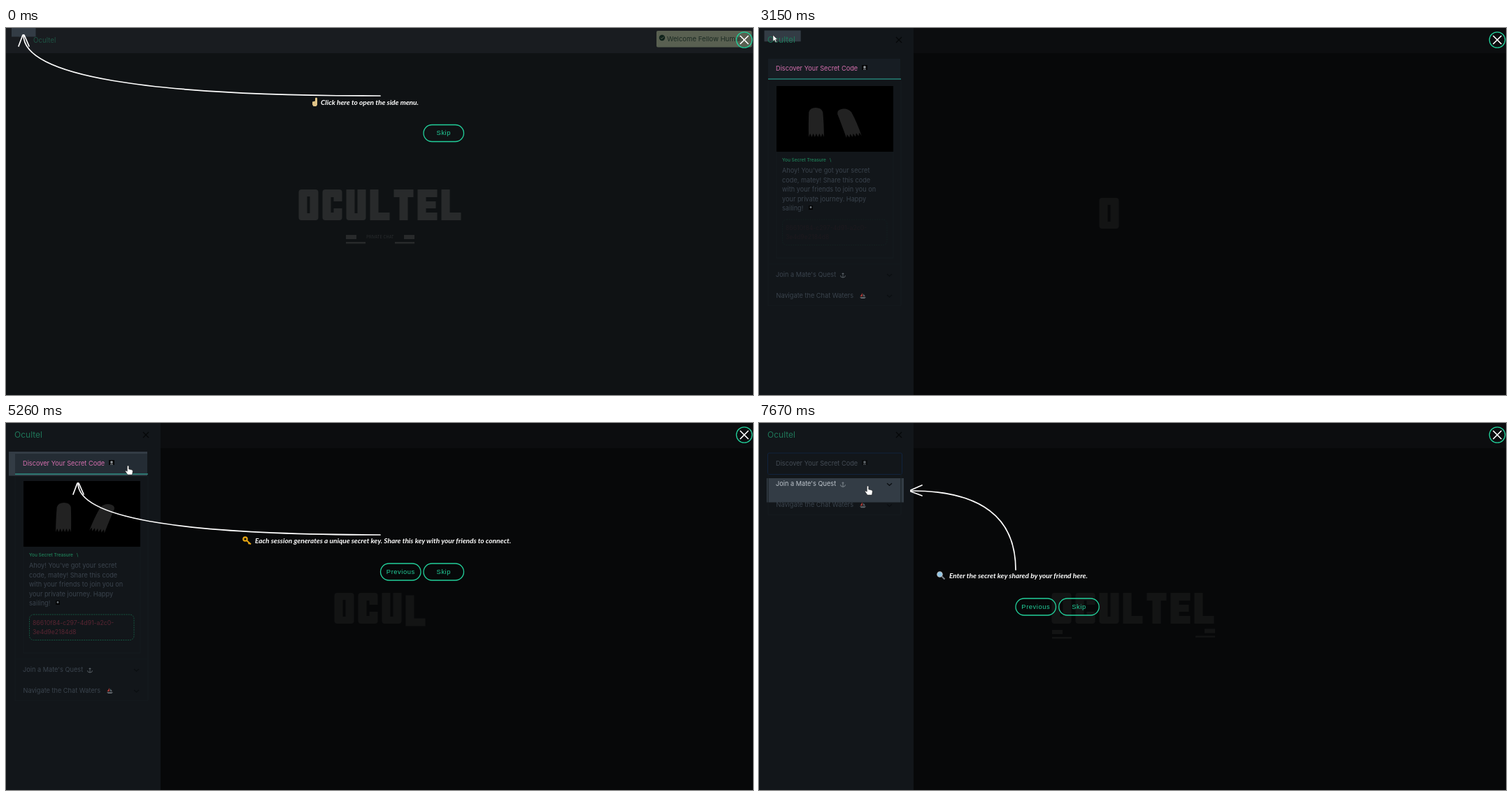
Recreate the animation shown at these times as an HTML page. Size 1068 by 525 pixels, loop 8 s.

```html
<!DOCTYPE html>
<html lang="en">
<head>
<meta charset="utf-8">
<title>Guided tour</title>
<style>
  html, body { margin: 0; width: 100%; height: 100%; overflow: hidden; background: #0f1214; }
  svg { display: block; width: 100vw; height: 100vh; }
  text { font: 9.2px Inter, "Open Sans", sans-serif; white-space: pre; }
  .label { font: italic bold 10.1px Lato, sans-serif; fill: #fff; }
  .button { font: 9.4px "Liberation Sans", Arial, sans-serif; letter-spacing: .55px; fill: #22cf9a; text-anchor: middle; }
  .line { fill: none; stroke: #fff; stroke-width: 1.7; stroke-linecap: round; stroke-linejoin: round; }
  .ring { fill: none; stroke: #22cf9a; stroke-width: 1.3; }
  .bars { fill: #282a2b; }
</style>
</head>
<body>
<svg viewBox="0 0 1068 525">
  <defs>
    <clipPath id="panelClip"><rect id="panelWindow" x="0" y="76" width="221" height="262"/></clipPath>
  </defs>

  <!-- page -->
  <rect width="1068" height="525" fill="#0f1214"/>
  <rect width="1068" height="36" fill="#191c20"/>
  <text x="39" y="20.5" style="font-size:9.7px" fill="#1f5444">Ocultel</text>
  <g id="logo" fill="#282a2b" fill-rule="evenodd"></g>
  <g id="barsLeft" class="bars"><path d="M486 296h15v6h-15zM486 306h28v2.4h-28z"/></g>
  <g id="barsRight" class="bars"><path d="M569 296h15v6h-15zM556 306h28v2.4h-28z"/></g>
  <text id="tagline" x="535" y="301" text-anchor="middle" style="font-size:5.6px" fill="#2b2e30">PRIVATE CHAT</text>
  <g id="toast">
    <rect x="930" y="4" width="136.5" height="23.5" rx="2" fill="#596051"/>
    <circle cx="938" cy="14" r="4.2" fill="#10231b"/>
    <path d="M936 14l1.5 1.6 2.8-3" fill="none" stroke="#596051"/>
    <text x="945" y="18.7" style="font-size:9.6px" fill="#1b2a22">Welcome Fellow Human</text>
  </g>
  <rect id="backdrop" width="1068" height="525"/>
  <rect id="progress" y="522" height="3" fill="#4fb0c6"/>

  <!-- side menu -->
  <rect class="side" width="221" height="525" fill="#12161a"/>
  <rect id="spotlight" fill="#333c45"/>
  <g class="side">
    <text x="12" y="21" style="font-size:12px" fill="#1f7659">Ocultel</text>
    <path d="M196 13l8 8m0-8l-8 8" stroke="#050709" stroke-width="1.3"/>
    <g id="openItem">
      <rect x="13" y="44" width="189" height="29" fill="#1b222a" opacity=".6"/>
      <path d="M13 73h190" stroke="#2fb3a2" stroke-width="1.2"/>
    </g>
    <rect id="focusBox" x="12.5" y="43" width="192" height="30.5" rx="2" fill="none" stroke="#10233d"/>
    <text id="discover" x="24" y="61">Discover Your Secret Code</text>
    <g id="flag"><path d="M147 53h8v7h-8z" fill="#050607"/><circle cx="151" cy="56" r="1.8" fill="#9aa0a5"/><path d="M149 59h4" stroke="#9aa0a5"/></g>

    <g clip-path="url(#panelClip)">
      <path d="M13 76V338H203V76M25 177V329H192V177M13 367H203" fill="none" stroke="#151a1f"/>
      <rect x="25" y="83" width="167" height="94" fill="#000"/>
      <g fill="#222">
        <path id="ghostLeft"/>
        <path id="ghostRight"/>
      </g>
      <text x="33" y="191.3" style="font-size:6.5px;font-weight:500" fill="#1f8259">You Secret Treasure   \</text>
      <g id="story" fill="#3a434d"></g>
      <path d="M71 254h6v6h-6z" fill="#050607"/><circle cx="74" cy="256.5" r="1.4" fill="#6b7278"/>
      <g id="code" fill="#592532">
        <rect x="33.5" y="274" width="149.5" height="36.5" rx="6" fill="none" stroke="#14543f" stroke-dasharray="2 1.3"/>
        <text x="38" y="288.5" style="font-size:8.7px">86610f84-c297-4d91-a2c0-</text>
        <text x="38" y="302" style="font-size:8.7px">3e4d9e2184d8</text>
      </g>
    </g>

    <g id="items">
      <path d="M13 338V397H203V338" fill="none" stroke="#151a1f"/>
      <text id="join" x="24" y="356.2">Join a Mate's Quest</text>
      <path id="anchor" d="M120 350v7m-3.5-3q0 3 3.5 3t3.5-3m-5-2.5h3" fill="none" stroke="#7d858c"/>
      <text x="24.5" y="386" fill="#3a434d">Navigate the Chat Waters</text>
      <path d="M148 379v5h-3.5z" fill="#a33a35"/><path d="M149 380v4h3zM144 385h9l-2 2h-5z" fill="#62686d"/>
      <path d="M183 352l3.5 3 3.5-3M183 382l3.5 3 3.5-3" fill="none" stroke="#0b0e11" stroke-width="1.3"/>
    </g>
  </g>

  <g id="tour"></g>
  <circle class="ring" cx="1055.5" cy="17" r="11.2"/>
  <path class="line" d="M1050 11.5l11 11m0-11l-11 11"/>

  <circle id="click" r="7" fill="#b3ae20" opacity=".88"/>
  <g id="cursor" stroke="#111" stroke-width=".5">
    <path id="pointer" fill="#fff" d="M0 0V9L2.2 7.2 3.8 10.5 5.3 9.8 3.8 6.6H6.5Z"/>
    <path id="hand" fill="#fff" d="M-1.2 1q1.2-1.8 2.4 0v4l4.2 1q1.6.5 1.4 2l-.8 5H-.5L-4 8q.5-1.6 2.8.2Z"/>
  </g>
</svg>
<script>
const LOOP = 8000;
const $ = id => document.getElementById(id);
const clamp = v => Math.max(0, Math.min(1, v));
const ramp = (t, from, to) => clamp((t - from) / (to - from));
const smooth = p => p * p * (3 - 2 * p);
const easeOut = p => 1 - (1 - p) ** 2;
const mix = (a, b, p) => a + (b - a) * p;
const set = (el, attrs) => { for (const k in attrs) el.setAttribute(k, attrs[k]); };
const show = (el, on) => el.setAttribute("opacity", +on);

// Block wordmark, each glyph 28 by 44
const bowl = "V40Q28 44 24 44H4Q0 44 0 40";
const glyphs = {
  O: `M4 0H24Q28 0 28 4${bowl}V4Q0 0 4 0ZM12 10V34H16V10Z`,
  C: `M4 0H24Q28 0 28 4V17H16V11H12V33H16V27H28${bowl}V4Q0 0 4 0Z`,
  U: `M0 0H12V34H16V0H28${bowl}Z`,
  L: "M0 0H12V33H28V44H0Z",
  T: "M0 0H28V11H20V44H8V11H0Z",
  E: "M0 0H28V11H12V17H26V27H12V33H28V44H0Z"
};
$("logo").innerHTML = [..."OCULTEL"].map(c => `<path d="${glyphs[c]}"/>`).join("");
const letters = [...$("logo").children];
const arrivals = [2420, 3200, 3860, 5150, 6250, 6650, 7100];

$("story").innerHTML = ["Ahoy! You've got your secret", "code, matey! Share this code",
  "with your friends to join you on", "your private journey. Happy", "sailing!"]
  .map((line, i) => `<text x="33" y="${207.3 + 13.5 * i}">${line}</text>`).join("");

// Tour steps: curve runs from the label to the arrow tip
const steps = [
  { textAt: -500, arrowAt: -300, to: 2700, text: "Click here to open the side menu.", x: 450, y: 109.5,
    curve: "M535 97Q25 97 25 10", head: "M18 26L24 10H26L33 26", buttons: [["Skip", 597, 138.5]],
    icon: '<path d="M442 100.5q1.5-1.8 3 0V110l-1.5 2h-4l-1.5-2.5v-4l4-1z" fill="#dfc387"/>' },
  { textAt: 3250, arrowAt: 3450, to: 6800, text: "Each session generates a unique secret key. Share this key with your friends to connect.", x: 356, y: 172.3,
    curve: "M535 160Q103 160 103 86", head: "M96 102L102 86H104L111 102", buttons: [["Previous", 535.5, 201], ["Skip", 597, 201]],
    icon: '<circle cx="342" cy="166" r="2.7" fill="none" stroke="#e5a512" stroke-width="2.2"/><path d="M344 168l6 5.5m-2-2l-1.5 1.5" stroke="#e5a512" stroke-width="2"/>' },
  { textAt: 7080, arrowAt: 7400, to: 9000, text: "Enter the secret key shared by your friend here.", x: 272, y: 222.3,
    curve: "M367 210Q367 97 217 97", head: "M233 89L217 96V98L233 104", buttons: [["Previous", 367, 251], ["Skip", 428.7, 251]],
    icon: '<circle cx="258.5" cy="216.5" r="3.6" fill="#8fc7e8" stroke="#b9c3ca" stroke-width="1.3"/><path d="M261.5 219.5l4 4" stroke="#77808a" stroke-width="2"/>' }
];
$("tour").innerHTML = steps.map(s => `<g>${s.icon}<text class="label" x="${s.x}" y="${s.y}">${s.text}</text>` +
  s.buttons.map(([name, x, y]) => `<rect class="ring" x="${x}" y="${y}" width="57.5" height="24" rx="12"/>
    <text class="button" x="${x + 28.8}" y="${y + 14.8}">${name}</text>`).join("") + "</g>" +
  `<path class="line" pathLength="1" d="${s.curve}"/><path class="line" d="${s.head}"/>`).join("");
const tourParts = [...$("tour").children];

const cursorPath = [[70, 420, 490], [870, 34, 24], [1010, 34, 23], [1540, 21, 20], [1730, 21, 20], [2400, 20, 10],
  [3150, 20, 10], [3870, 110, 101], [3990, 110, 101], [4780, 154, 64], [4920, 154, 64], [5200, 174.5, 61],
  [6750, 174.5, 61], [7500, 155.5, 90]];
const spotlightPath = [[3100, 8, -1, 34.5, 13.5], [3350, 4, 41, 198, 34.5], [6850, 4, 41, 198, 34.5], [7100, 11, 79, 196, 34.5]];

function follow(path, t) {
  const next = path.findIndex(k => k[0] > t);
  if (next < 0) return path[path.length - 1].slice(1);
  if (next === 0) return path[0].slice(1);
  const a = path[next - 1], b = path[next], p = smooth(ramp(t, a[0], b[0]));
  return a.slice(1).map((v, i) => mix(v, b[i + 1], p));
}

// Ragged-hem ghost that bends around its hem
function ghost(x, bend) {
  const lean = y => bend * (1 - y) ** 1.4;
  const side = (dx, y) => `${x + dx + lean(y)} ${114 + 42 * y}`;
  let d = `M${side(-11, 1)}Q${side(-11, .5)} ${side(-10, .15)}Q${side(-8, 0)} ${side(0, 0)}Q${side(8, 0)} ${side(10, .15)}Q${side(11, .5)} ${side(11, 1)}`;
  for (let i = 1; i < 10; i++) d += `L${side(11 - 2.2 * i, i % 2 ? .88 : 1)}`;
  return d + "Z";
}

function drawLogo(t) {
  const rebuilding = t >= 2420;
  const leaving = 1 - ramp(t, 1850, 2300);
  const count = rebuilding ? Math.max(3, arrivals.filter(a => t >= a).length) : 7;
  letters.forEach((letter, i) => {
    const p = rebuilding ? ramp(t, arrivals[i], arrivals[i] + 190) : 1;
    const x = 537.5 - count * 17 + i * 34;
    const y = rebuilding ? 243 + 20 * (1 - easeOut(p)) : 231;
    set(letter, { transform: `translate(${x} ${y})`, opacity: rebuilding ? clamp(p * 2) : leaving });
  });
  const bars = rebuilding ? ramp(t, 7420, 7600) : leaving;
  set($("barsLeft"), { opacity: bars, transform: `translate(${rebuilding ? -67 : 0} 0)` });
  set($("barsRight"), { opacity: bars, transform: `translate(${rebuilding ? 68 : 0} ${rebuilding ? -1.6 : 0})` });
  show($("tagline"), 1 - ramp(t, 1600, 2000));
}

function drawMenu(t) {
  const open = easeOut(ramp(t, 2680, 2960));
  const fold = smooth(ramp(t, 6620, 6980));
  document.querySelectorAll(".side").forEach(el => set(el, { transform: `translate(${-222 * (1 - open)} 0)` }));
  show($("backdrop"), .53 * open);
  set($("progress"), { width: 1068 * ramp(t, 2580, 2980) ** .9, opacity: +(t < 2980) });
  set($("panelWindow"), { height: 262 * (1 - fold) });
  set($("items"), { transform: `translate(0 ${-265.7 * fold})` });

  const closed = t >= 6850;
  show($("openItem"), !closed);
  show($("focusBox"), closed);
  set($("discover"), { fill: closed ? "#444c55" : "#d56fae" });
  show($("flag"), closed ? .6 : 1);
  set($("join"), { fill: t >= 7050 ? "#bcc3ca" : "#3a434d" });
  show($("anchor"), t >= 7050 ? 1 : .6);
  show($("code"), mix(.15, 1, ramp(t, 4950, 5150)));

  const sway = Math.cos(2 * Math.PI * (t - 5260) / 867);
  set($("ghostLeft"), { d: ghost(82, sway) });
  set($("ghostRight"), { d: ghost(133, 12 * sway), transform: `rotate(${9 * sway} 133 136)` });
}

function drawTour(t) {
  steps.forEach((s, i) => {
    const [label, curve, head] = tourParts.slice(i * 3);
    const active = t < s.to;
    show(label, active ? ramp(t, s.textAt, s.textAt + 150) : 0);
    const drawn = ramp(t, s.arrowAt, s.arrowAt + 200);
    set(curve, { "stroke-dasharray": `${drawn} 2`, opacity: +(active && drawn > 0) });
    show(head, active && drawn === 1);
  });
  const [x, y, width, height] = follow(spotlightPath, t);
  set($("spotlight"), { x, y, width, height });
}

function drawCursor(t) {
  const [x, y] = follow(cursorPath, t);
  set($("cursor"), { transform: `translate(${x} ${y})`, opacity: +(t >= 70) });
  const hand = (t > 2100 && t < 3150) || t > 4600;
  show($("hand"), hand);
  show($("pointer"), !hand);
  const first = t >= 2540 && t < 2760;
  const second = t >= 6500 && t < 6720;
  set($("click"), { cx: first ? 18.5 : 174, cy: first ? 9 : 61, visibility: first || second ? "visible" : "hidden" });
}

function frame(now) {
  const t = now % LOOP;
  show($("toast"), 1 - ramp(t, 70, 450));
  drawLogo(t);
  drawMenu(t);
  drawTour(t);
  drawCursor(t);
  requestAnimationFrame(frame);
}
frame(0);
</script>
</body>
</html>
```
